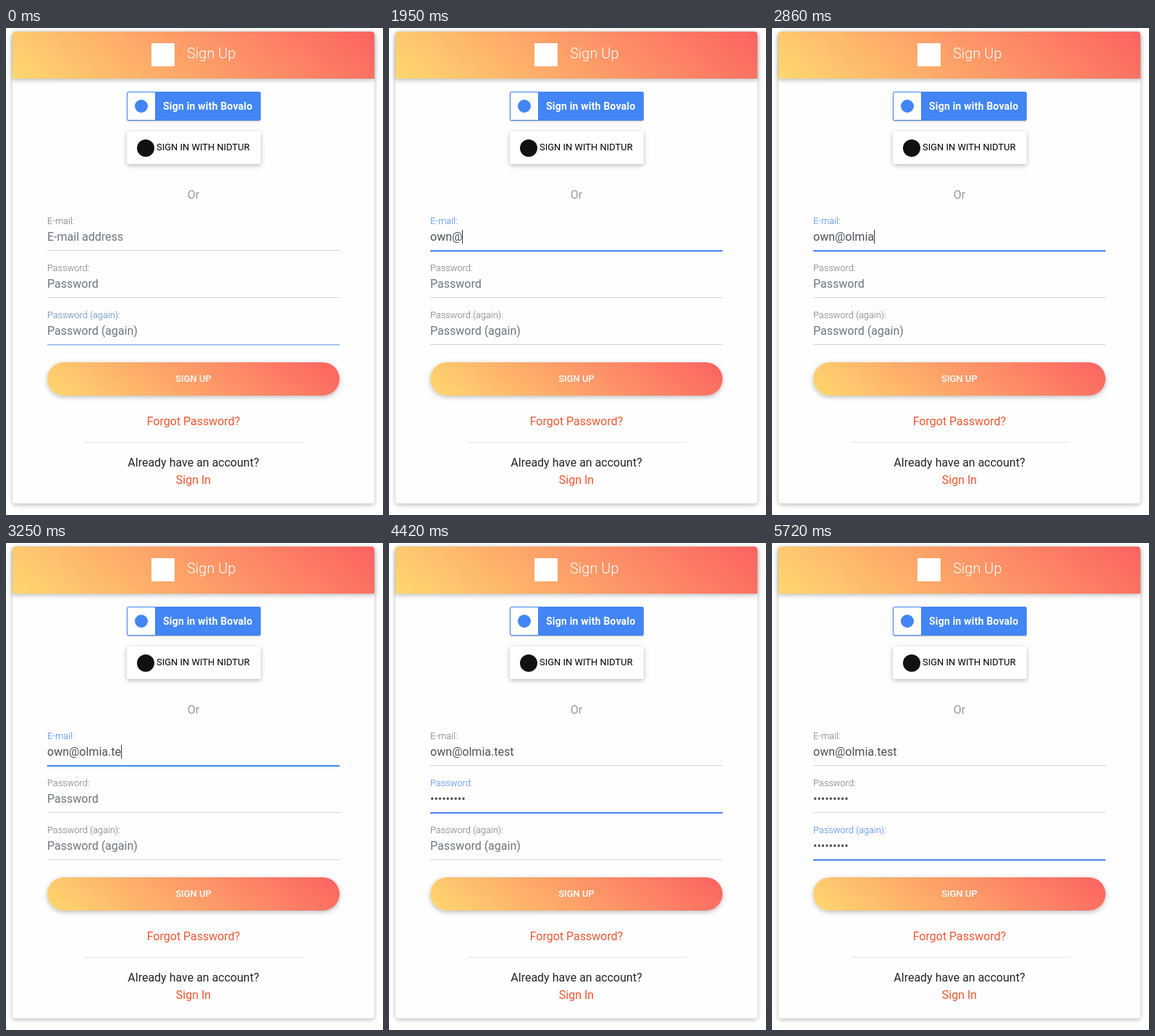
An HTML page for the animation above (5850 ms loop, 521 px wide and 673 px high).

```html
<!DOCTYPE html>
<html lang="en">
<head>
<meta charset="utf-8">
<title>Sign Up</title>
<style>
  html, body { margin: 0; width: 100%; height: 100%; overflow: hidden; background: #fff; }
  #stage { position: relative; width: 521px; height: 673px; overflow: hidden; }
  #stage > * { position: absolute; box-sizing: border-box; }
  .card, .head, .btn { box-shadow: 0 2px 5px rgba(0,0,0,.16), 0 2px 10px rgba(0,0,0,.12); }
  .card { left: 9px; top: 5px; width: 500px; height: 652px; border-radius: 4px; background: #fefefe; }
  .peach { background: linear-gradient(40deg, #ffd86f, #fc6262); }
  .head { left: 9px; top: 5px; width: 500px; height: 65px; border-radius: 4px 4px 0 0; }
  .blue { left: 167px; top: 88px; width: 185px; height: 40px; border: 1px solid #4285f4; border-radius: 2px;
    background: linear-gradient(90deg, #fff 38px, #4285f4 38px); box-shadow: 0 1px 2px rgba(0,0,0,.25); }
  .white { left: 167px; top: 143px; width: 185px; height: 45px; border-radius: 2px; background: #fff; }
  .submit { left: 57px; top: 462px; width: 404px; height: 46px; border-radius: 23px; }
  svg { left: 0; top: 0; font: 400 16px Roboto, Arial, sans-serif; }
  .mid { text-anchor: middle; }
  .link { fill: #f0562f; }
  .label { font-size: 12.8px; font-weight: 300; }
</style>
</head>
<body>
<div id="stage">
  <div class="card"></div>
  <div class="head peach"></div>
  <div class="blue"></div>
  <div class="white btn"></div>
  <div class="submit peach btn"></div>
  <svg id="art" width="521" height="673" viewBox="0 0 521 673">
    <rect x="201" y="21" width="32" height="32" fill="#fff"/>
    <text x="250" y="42" font-size="20" font-weight="300" fill="#fff">Sign Up</text>
    <circle cx="187" cy="108" r="9" fill="#4285f4"/>
    <text x="217" y="113" font-size="14" font-weight="700" letter-spacing=".21" fill="#fff">Sign in with Bovalo</text>
    <circle cx="193" cy="166" r="12" fill="#111"/>
    <text x="208" y="169" font-size="12.96" fill="#000">SIGN IN WITH NIDTUR</text>
    <text class="mid" x="259" y="236" fill="#999">Or</text>
    <text class="mid" x="259" y="489" font-size="12.96" font-weight="500" fill="#fff">SIGN UP</text>
    <text class="mid link" x="259" y="549">Forgot Password?</text>
    <rect x="109" y="572" width="302" height="1" fill="#e4e4e4"/>
    <text class="mid" x="259" y="606" fill="#212529">Already have an account?</text>
    <text class="mid link" x="259" y="630">Sign In</text>
  </svg>
</div>
<script>
const LEFT = 57, BLUE = [66, 133, 244], GREY = [112, 117, 122];
const MAIL = 'own@olmia.test', DOTS = '•'.repeat(9);
// All times below are counted in ticks
const TICK = 130, TICKS = 45;
const KEYS = [9, 9, 10, 15, 17, 18, 19, 21, 22, 24, 25, 25, 26, 26];
const BLINKS = [34, 44];
const art = document.getElementById('art');

function add(tag, attrs, text = '') {
  const el = document.createElementNS('http://www.w3.org/2000/svg', tag);
  for (const key in attrs) el.setAttribute(key, attrs[key]);
  el.textContent = text;
  return art.appendChild(el);
}

function makeField(name, hint, y, on, off, ramp, text) {
  const line = (dy, fill) => add('rect', { x: LEFT, y: y + dy, width: 404, height: 1, fill });
  const label = add('text', { x: LEFT, y: y - 36, class: 'label' }, name);
  line(0, '#ced4da');
  return { label, hint, y, on, off, ramp, text,
           glow: [line(0, '#4285f4'), line(1, '#4285f4')],
           value: add('text', { x: LEFT, y: y - 13 }) };
}

const fields = [
  makeField('E-mail:', 'E-mail address', 307, 4, 27, 3, n => MAIL.slice(0, KEYS.filter(k => k <= n).length)),
  makeField('Password:', 'Password', 372, 27, 35, 2, n => n < 30 ? '' : DOTS),
  makeField('Password (again):', 'Password (again)', 437, 35, TICKS, 2, n => n < 39 ? '' : DOTS)
];
const caret = add('rect', { width: 1, height: 19, fill: '#30363c' });

const mix = k => `rgb(${GREY.map((g, i) => Math.round(g + (BLUE[i] - g) * k))})`;

function focusAt(n, { on, off, ramp }) {
  if (n === off % TICKS) return .5;
  return n >= on && n < off ? Math.min(1, (n - on + 1) / ramp) : 0;
}

function show(n) {
  caret.style.display = 'none';
  for (const field of fields) {
    const { label, glow, value, y } = field;
    const k = focusAt(n, field), text = field.text(n);
    label.style.fill = mix(k);
    glow[0].style.opacity = k;
    glow[1].style.opacity = k * k;
    value.textContent = text || field.hint;
    value.style.fill = text ? '#495057' : '#6c757d';
    if (n >= field.on && n < field.off && !BLINKS.includes(n)) {
      caret.style.display = '';
      caret.setAttribute('x', Math.round(LEFT + (text ? value.getComputedTextLength() : 0)));
      caret.setAttribute('y', y - 28);
    }
  }
}

const start = performance.now();
function tick() {
  show(Math.floor((performance.now() - start) / TICK) % TICKS);
  requestAnimationFrame(tick);
}
tick();
</script>
</body>
</html>
```
